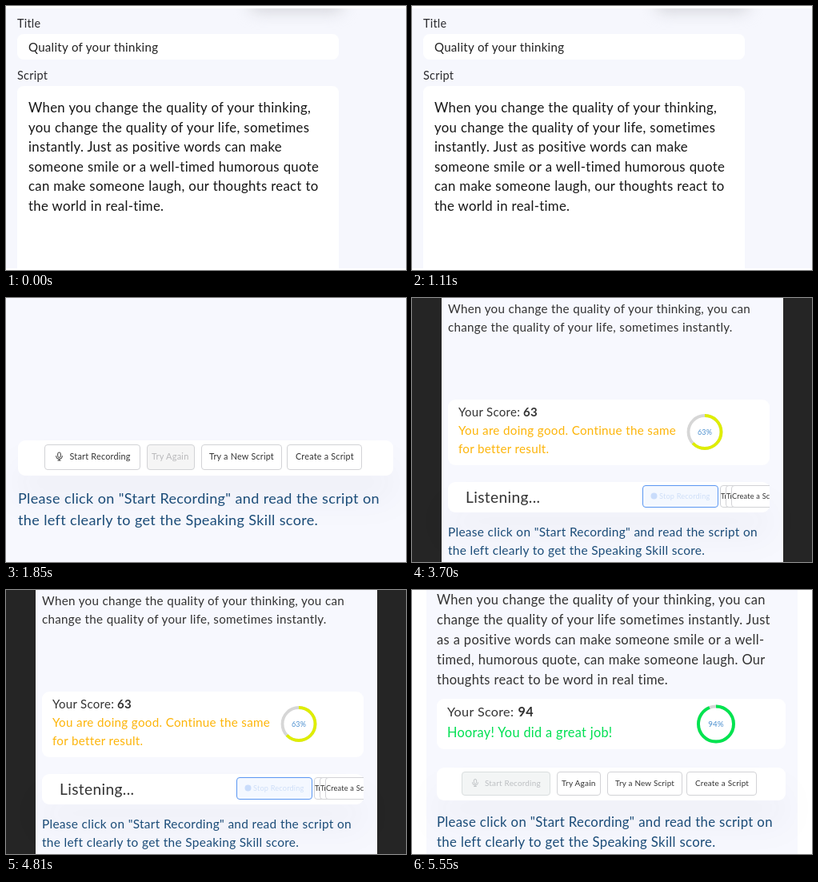
Write an HTML page that moves like this. It is 500 by 330 pixels and loops after 7400 ms.

```html
<!DOCTYPE html>
<html lang="en">
<head>
<meta charset="utf-8">
<title>Speaking practice</title>
<style>
html, body { margin: 0; width: 100%; height: 100%; overflow: hidden; background: #fff; }
#stage { display: block; width: 500px; height: 330px; }
text { font-family: Lato, "Open Sans", sans-serif; letter-spacing: .018em; word-spacing: .012em; white-space: pre; }
.soft { filter: drop-shadow(0 30px 20px rgba(30, 35, 70, .04)); }
</style>
</head>
<body>
<svg id="stage" viewBox="0 0 500 330"></svg>
<script>
const BG = '#f7f8fe', INK = '#333', NAVY = '#1b4c78';
const STEP = 1850;

const rect = (x, y, w, h, fill, r = 0, more = '') =>
  `<rect x="${x}" y="${y}" width="${w}" height="${h}" rx="${r}" fill="${fill}" ${more}/>`;

const text = (x, y, size, fill, str, more = '') =>
  `<text x="${x}" y="${y}" font-size="${size}" fill="${fill}" ${more}>${str}</text>`;

const lines = (x, y, pitch, size, fill, list) =>
  list.map((s, i) => text(x, y + i * pitch, size, fill, s)).join('');

const box = (x, y, w, h, fill = '#fff', stroke = '#d2d3d6') =>
  rect(x + .5, y + .5, w - 1, h - 1, fill, 3.5, `stroke="${stroke}"`);

const panel = (x, y, w, h) => rect(x, y, w, h, '#fff', 9, 'class="soft"');

const mic = (x, y, s, color) =>
  `<g transform="translate(${x} ${y}) scale(${s})" fill="none" stroke="${color}">
    <rect x="-1.8" y="-5" width="3.6" height="6.4" rx="1.8"/>
    <path d="M-3.8 -.8V0a3.8 3.3 0 0 0 7.6 0V-.8M0 3.4V5M-2 5H2"/></g>`;

const ring = (x, y, r, width, color, percent, size) => {
  const circle = (stroke, more) =>
    `<circle cx="${x}" cy="${y}" r="${r}" fill="none" stroke="${stroke}" stroke-width="${width}" ${more}/>`;
  return circle('#d6d6d6', '') +
    circle(color, `pathLength="100" stroke-dasharray="${percent} 100" transform="rotate(-90 ${x} ${y})"`) +
    text(x, y + 3.3, size, '#4b8fcf', percent + '%', 'text-anchor="middle"');
};

const score = (x, y, size, valueX, value) =>
  text(x, y, size, INK, 'Your Score:') +
  text(valueX, y, size, INK, value, 'font-weight="700"');

const hint = (x, y, pitch, size) => lines(x, y, pitch, size, NAVY, [
  'Please click on "Start Recording" and read the script on',
  'the left clearly to get the Speaking Skill score.'
]);

const scriptForm = () =>
  rect(0, 0, 500, 330, '#fff') +
  `<svg y="3" width="500" height="325" viewBox="0 3 500 325">
    ${rect(0, 3, 500, 325, '#f6f7fd')}
    ${rect(306, -36, 114, 42, '#d0d1d7', 6, 'style="filter:blur(10px)"')}
    ${rect(14, 35, 402, 32, '#fff', 8)}
    ${rect(14, 100, 402, 250, '#fff', 8)}
  </svg>` +
  text(14, 26.5, 14.4, '#2b2b2f', 'Title') +
  text(28, 56.5, 15.05, '#222', 'Quality of your thinking') +
  text(14, 91.5, 14.5, '#2b2b2f', 'Script') +
  lines(28, 133, 24.5, 16.75, '#161616', [
    'When you change the quality of your thinking,',
    'you change the quality of your life, sometimes',
    'instantly. Just as positive words can make',
    'someone smile or a well-timed humorous quote',
    'can make someone laugh, our thoughts react to',
    'the world in real-time.'
  ]);

const ready = () =>
  rect(0, 0, 500, 330, BG) +
  panel(15, 178, 469, 44) +
  box(48, 183, 120, 32) + mic(66.5, 198, 1, INK) + text(79.5, 202, 10.85, INK, 'Start Recording') +
  box(176, 183, 60, 32, '#f5f5f5') + text(182, 202, 11, '#b9b9bb', 'Try Again') +
  box(244, 183, 101, 32) + text(254, 202, 10.8, INK, 'Try a New Script') +
  box(351, 183, 94, 32) + text(362, 202, 10.8, INK, 'Create a Script') +
  hint(15, 257, 27, 18.05);

const listening = () =>
  rect(0, 0, 500, 330, '#252525') + rect(37, 0, 427, 330, BG) +
  lines(45, 19, 23, 15.2, INK, [
    'When you change the quality of your thinking, you can',
    'change the quality of your life, sometimes instantly.'
  ]) +
  rect(45, 127, 402, 82, '#fff', 9) +
  score(58, 148, 15, 139, 63) +
  lines(58, 171, 23, 15.2, '#fdb50a', ['You are doing good. Continue the same', 'for better result.']) +
  ring(366, 167.5, 20.5, 3.8, '#dfee00', 63, 9) +
  panel(45, 230, 402, 38) +
  text(67, 256, 19.2, INK, 'Listening...') +
  box(288, 234, 95, 28, '#f4f8ff', '#5b97f2') +
  '<circle cx="302.5" cy="247.5" r="4" fill="#c9dcfb"/>' +
  text(309, 251, 9.2, '#cfdff8', 'Stop Recording') +
  `<svg x="385" width="62" height="330" viewBox="385 0 62 330">
    ${box(385, 234, 60, 28)}${text(386, 251, 9.2, INK, 'Try Again')}
    ${box(392, 234, 80, 28)}${text(393, 251, 9.2, INK, 'Try a New Script')}
    ${box(399, 234, 80, 28)}${text(400, 251, 9.2, INK, 'Create a Script')}
  </svg>` +
  hint(45, 298, 23, 15.45);

const finished = () =>
  rect(0, 0, 500, 330, '#fff') + rect(18, 0, 464, 330, BG) +
  lines(31, 18, 25, 16.5, INK, [
    'When you change the quality of your thinking, you can',
    'change the quality of your life sometimes instantly. Just',
    'as a positive words can make someone smile or a well-',
    'timed, humorous quote, can make someone laugh. Our',
    'thoughts react to be word in real time.'
  ]) +
  rect(31, 136, 436, 63, '#fff', 9) +
  score(44, 158, 16.2, 132.5, 94) +
  text(44, 183.5, 16.3, '#00e052', 'Hooray! You did a great job!') +
  ring(380, 167.5, 22, 3.9, '#00e44f', 94, 9.8) +
  panel(31, 222, 436, 41) +
  box(62, 227, 111, 30, '#f3f5f5', '#d9dedf') + mic(79, 241, .9, '#bcbfc2') +
  text(91, 244.5, 9.95, '#bcbfc2', 'Start Recording') +
  box(181, 227, 55, 30) + text(187, 244.5, 10.1, INK, 'Try Again') +
  box(244, 227, 94, 30) + text(254, 244.5, 9.9, INK, 'Try a New Script') +
  box(343, 227, 88, 30) + text(354, 244.5, 9.95, INK, 'Create a Script') +
  hint(31, 296, 25, 16.75);

const stage = document.getElementById('stage');
const scenes = [scriptForm, ready, listening, finished].map(draw => draw());
let shown = -1;

function tick() {
  const now = Math.floor(performance.now() / STEP) % scenes.length;
  if (now !== shown) stage.innerHTML = scenes[shown = now];
  requestAnimationFrame(tick);
}
tick();
</script>
</body>
</html>
```
